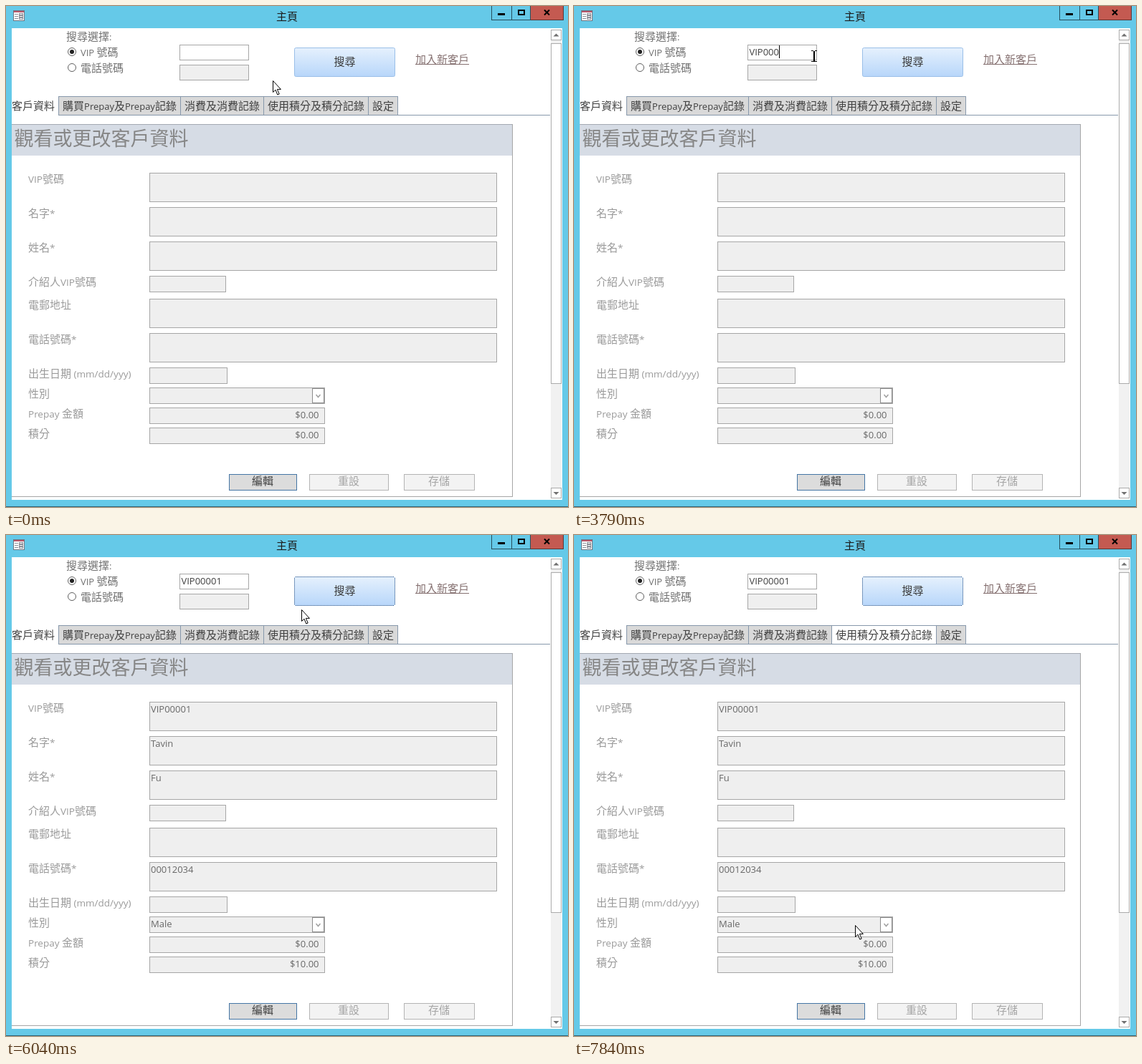
Recreate the animation shown at these times as an HTML page with a canvas. Size 784x700 px, loop 8 s.

```html
<!DOCTYPE html>
<html lang="zh-Hant">
<head>
<meta charset="utf-8">
<title>主頁</title>
<style>
html, body { margin: 0; width: 100%; height: 100%; overflow: hidden; background: #65c9e8; }
canvas { display: block; }
</style>
</head>
<body>
<canvas id="stage" width="784" height="700"></canvas>
<script>
const ctx = document.getElementById('stage').getContext('2d');
const LOOP = 8000;
const CJK = '"Noto Sans CJK TC", "Noto Sans CJK HK", "Noto Sans CJK JP", "Noto Sans CJK", sans-serif';
const LATIN = '"Open Sans", "Noto Sans", sans-serif';
const BLUE = '#65c9e8', GRAY = '#a6a6a6', FIELD = '#efefef', EDGE = '#8798ab';

function fill(x, y, w, h, color) {
  ctx.fillStyle = color;
  ctx.fillRect(x, y, w, h);
}

// Box with a one pixel border, given by its outer edges.
function box(x1, y1, x2, y2, color, border = GRAY) {
  fill(x1, y1, x2 - x1, y2 - y1, border);
  fill(x1 + 1, y1 + 1, x2 - x1 - 2, y2 - y1 - 2, color);
}

function line(points, color, width = 1) {
  ctx.beginPath();
  points.forEach(([x, y]) => ctx.lineTo(x, y));
  ctx.strokeStyle = color;
  ctx.lineWidth = width;
  ctx.stroke();
}

function shape(points, color, x, y) {
  ctx.beginPath();
  points.forEach(([px, py]) => ctx.lineTo(x + px, y + py));
  ctx.closePath();
  ctx.fillStyle = color;
  ctx.fill();
}

// Mixed text: Chinese runs and smaller Latin runs share a baseline.
function layout(str, { size = 15, latin = 13 } = {}) {
  const parts = str.match(/[\u2e80-\u9fff]+|[^\u2e80-\u9fff]+/g) || [];
  return parts.map(run => {
    const font = run.charCodeAt(0) > 0x2e7f ? `300 ${size}px ${CJK}` : `${latin}px ${LATIN}`;
    ctx.font = font;
    return { run, font, width: ctx.measureText(run).width };
  });
}

function measure(str, style) {
  return layout(str, style).reduce((sum, part) => sum + part.width, 0);
}

function text(str, x, y, color, style = {}) {
  if (style.align === 'right') x -= measure(str, style);
  if (style.align === 'center') x -= measure(str, style) / 2;
  for (const { run, font, width } of layout(str, style)) {
    ctx.font = font;
    ctx.fillStyle = color;
    ctx.fillText(run, x, y);
    x += width;
  }
}

// Each leg bends from the previous stop towards "via" and ends at "stop".
const START = [372, 104];
const STEP = 75;
const legs = [
  { from: 700, to: 1060, via: [352, 84], stop: [334, 70] },
  { from: 5100, to: 5210, via: [368, 80], stop: [397, 90] },
  { from: 5290, to: 5560, via: [406, 89], stop: [411, 87] },
  { from: 6040, to: 6440, via: [418, 200], stop: [387, 392] },
  { from: 6530, to: 6750, via: [381, 470], stop: [381, 512] },
  { from: 7050, to: 7530, via: [410, 558], stop: [454, 573] },
  { from: 7610, to: 7840, via: [440, 562], stop: [392, 545] }
];

const ease = u => u * u * (3 - 2 * u);

// The pointer moves in regular jumps along its path.
function pointerAt(t) {
  let pos = START;
  for (const { from, to, via, stop } of legs) {
    if (t < from) break;
    const count = Math.round((to - from) / STEP) + 1;
    const done = Math.floor((t - from) * (count - 1) / (to - from)) + 1;
    const u = ease(Math.min(1, done / count)), v = 1 - u;
    pos = pos.map((p, i) => Math.round(v * v * p + 2 * u * v * via[i] + u * u * stop[i]));
  }
  return pos;
}

const CODE = 'VIP00001';
const bursts = [
  { at: 2540, keys: 3, gap: 130 },
  { at: 3490, keys: 3, gap: 150 },
  { at: 4280, keys: 2, gap: 140 }
];
const keyTimes = bursts.flatMap(b => Array.from({ length: b.keys }, (_, i) => b.at + i * b.gap));
const ENTER = 140, BLINK = 540, FOCUS = 5520, RESULT = 5560, TAB_HOVER = 6120;

const rows = [
  { label: 'VIP號碼', tall: true, after: CODE },
  { label: '名字*', tall: true, after: 'Tavin' },
  { label: '姓名*', tall: true, after: 'Fu' },
  { label: '介紹人VIP號碼', width: 107 },
  { label: '電郵地址', tall: true },
  { label: '電話號碼*', tall: true, after: '00012034' },
  { label: '出生日期 (mm/dd/yyy)', width: 109 },
  { label: '性別', width: 245, after: 'Male', combo: true },
  { label: 'Prepay 金額', width: 245, before: '$0.00', after: '$0.00' },
  { label: '積分', width: 245, before: '$0.00', after: '$10.00' }
];

const tabs = ['購買Prepay及Prepay記錄', '消費及消費記錄', '使用積分及積分記錄', '設定'];

function drawWindow() {
  fill(0, 0, 784, 700, BLUE);
  fill(0, 699, 784, 1, '#2c6379');
  fill(8, 31, 768, 659, '#fff');
  text('主頁', 392, 20, '#1c1c1c', { align: 'center' });

  box(10, 6, 26, 21, '#fff', '#6f7480');
  fill(11, 7, 14, 2, '#b9596c');
  for (const y of [11, 14, 17]) {
    fill(12, y, 5, 1, '#8a8f98');
    box(18, y - 1, 24, y + 2, '#fff', '#8a8f98');
  }

  box(677, -1, 706, 20, BLUE, '#28505e');
  box(705, -1, 732, 20, BLUE, '#28505e');
  fill(732, 0, 46, 20, '#5c3434');
  fill(732, 0, 45, 19, '#c45a51');
  fill(686, 10, 10, 3, '#000');
  fill(714, 5, 10, 8, '#000');
  fill(716, 7, 6, 4, BLUE);
  line([[751, 5.5], [758, 12.5]], '#000', 2);
  line([[758, 5.5], [751, 12.5]], '#000', 2);
}

function drawScrollbar() {
  fill(760, 33, 15, 655, '#f1f1f1');
  for (const [top, bottom] of [[33, 48], [52, 528], [673, 688]]) {
    box(760, top, 775, bottom, '#fff', '#ababab');
  }
  shape([[-4, 2], [0, -2], [4, 2]], '#707070', 767.5, 40.5);
  shape([[-4, -2], [0, 2], [4, -2]], '#707070', 767.5, 681);
}

function drawRadio(y, on) {
  ctx.beginPath();
  ctx.arc(92, y, 5.5, 0, 7);
  ctx.strokeStyle = '#606060';
  ctx.lineWidth = 1;
  ctx.stroke();
  if (!on) return;
  ctx.beginPath();
  ctx.arc(92, y, 3, 0, 7);
  ctx.fillStyle = '#222';
  ctx.fill();
}

function drawInput(t) {
  box(242, 54, 339, 76, '#fff');
  box(242, 82, 339, 104, FIELD);
  const pressed = keyTimes.filter(k => t >= k);
  const typed = CODE.slice(0, pressed.length);
  text(typed, 244.5, 69, '#404040');

  const idle = t - (pressed.pop() || ENTER);
  const lit = idle >= 0 && Math.floor(idle / BLINK) % 2 === 0;
  if (lit && t < FOCUS) fill(244 + Math.ceil(measure(typed)), 55, 1, 18, '#000');
}

function drawSearchButton(focused) {
  const shade = ctx.createLinearGradient(0, 58, 0, 99);
  shade.addColorStop(0, '#e6f1fd');
  shade.addColorStop(1, '#b7d6fa');
  ctx.beginPath();
  ctx.roundRect(402.5, 58.5, 140, 40, 2);
  ctx.fillStyle = shade;
  ctx.fill();
  ctx.strokeStyle = focused ? '#d4e6fb' : '#9abfe8';
  ctx.lineWidth = 1;
  ctx.stroke();
  if (focused) {
    ctx.setLineDash([1, 1]);
    for (const y of [58.5, 98.5]) line([[404, y], [541, y]], '#1f4a80');
    for (const x of [402.5, 542.5]) line([[x, 60], [x, 97]], '#1f4a80');
    ctx.setLineDash([]);
  }
  text('搜尋', 472.5, 83, '#3a3a3a', { align: 'center' });
}

function drawSearch(t) {
  const ink = '#727272';
  text('搜尋選擇:', 84, 48, ink);
  drawRadio(64, true);
  drawRadio(86, false);
  text('VIP 號碼', 104, 70, ink);
  text('電話號碼', 104, 92, ink);
  drawInput(t);
  drawSearchButton(t >= FOCUS);
  text('加入新客戶', 571, 80, '#857070');
  fill(571, 81, 75, 1, '#857070');
}

function drawTabs(t) {
  text('客戶資料', 8, 145, '#404040');
  let left = 73;
  tabs.forEach((label, i) => {
    const width = Math.round(measure(label) + 11);
    const hot = i === 2 && t >= TAB_HOVER;
    box(left, 126, left + width + 1, 153, hot ? '#fff' : '#d9d9d9', EDGE);
    text(label, left + width / 2 + .5, 145, '#404040', { align: 'center' });
    left += width;
  });
  fill(73, 152, 686, 1, EDGE);
}

function drawButton(label, left, right, color, border, ink) {
  box(left, 654, right, 677, color, border);
  text(label, (left + right) / 2 - .5, 669, ink, { align: 'center' });
}

function drawRows(t) {
  let y = 233, wasTall = true;
  for (const { label, tall, width = 485, before = '', after = '', combo } of rows) {
    if (tall && !wasTall) y += 4;
    text(label, 31, y + 14, '#9a9a9a', { latin: 13.5 });
    box(200, y, 200 + width, y + (tall ? 41 : 23), FIELD);

    const value = t >= RESULT ? after : before;
    if (before) text(value, 436.5, y + 15, '#686868', { align: 'right' });
    else text(value, 202, y + 15, '#686868');
    if (combo) {
      box(427, y + 1, 444, y + 22, '#fff', '#8c8c8c');
      line([[432.5, y + 10], [435.5, y + 13.5], [438.5, y + 10]], '#a0a0a0', 1.5);
    }
    y += tall ? 48 : 28;
    wasTall = tall;
  }
}

function drawForm(t) {
  fill(8, 165, 699, 44, '#d6dce5');
  fill(8, 165, 699, 1, '#a3a9b2');
  fill(706, 165, 1, 521, GRAY);
  fill(8, 685, 699, 1, GRAY);
  text('觀看或更改客戶資料', 11.5, 195, '#868686', { size: 27 });
  drawRows(t);
  drawButton('編輯', 311, 406, '#dcdcdc', '#4576a5', '#404040');
  drawButton('重設', 423, 534, '#f3f3f3', '#b4b4b4', GRAY);
  drawButton('存儲', 555, 654, '#f3f3f3', '#b4b4b4', GRAY);
}

const ARROW = [[.5, .5], [.5, 16.5], [4, 13.2], [6.8, 20], [9.2, 19], [6.4, 12.4], [11.4, 12.4]];

function drawPointer(t) {
  const [x, y] = pointerAt(t);
  if (x > 242 && x < 339 && y > 54 && y < 76) {
    fill(x, y - 7, 2, 15, '#000');
    for (const edge of [y - 8, y + 7]) {
      fill(x - 3, edge, 3, 1, '#000');
      fill(x + 2, edge, 3, 1, '#000');
    }
    return;
  }
  shape(ARROW, '#fff', x, y);
  ctx.strokeStyle = '#000';
  ctx.lineWidth = 1;
  ctx.stroke();
}

function draw(t) {
  drawWindow();
  drawScrollbar();
  drawSearch(t);
  drawTabs(t);
  drawForm(t);
  drawPointer(t);
}

const start = performance.now();
function tick() {
  draw((performance.now() - start) % LOOP);
  requestAnimationFrame(tick);
}
tick();
</script>
</body>
</html>
```
